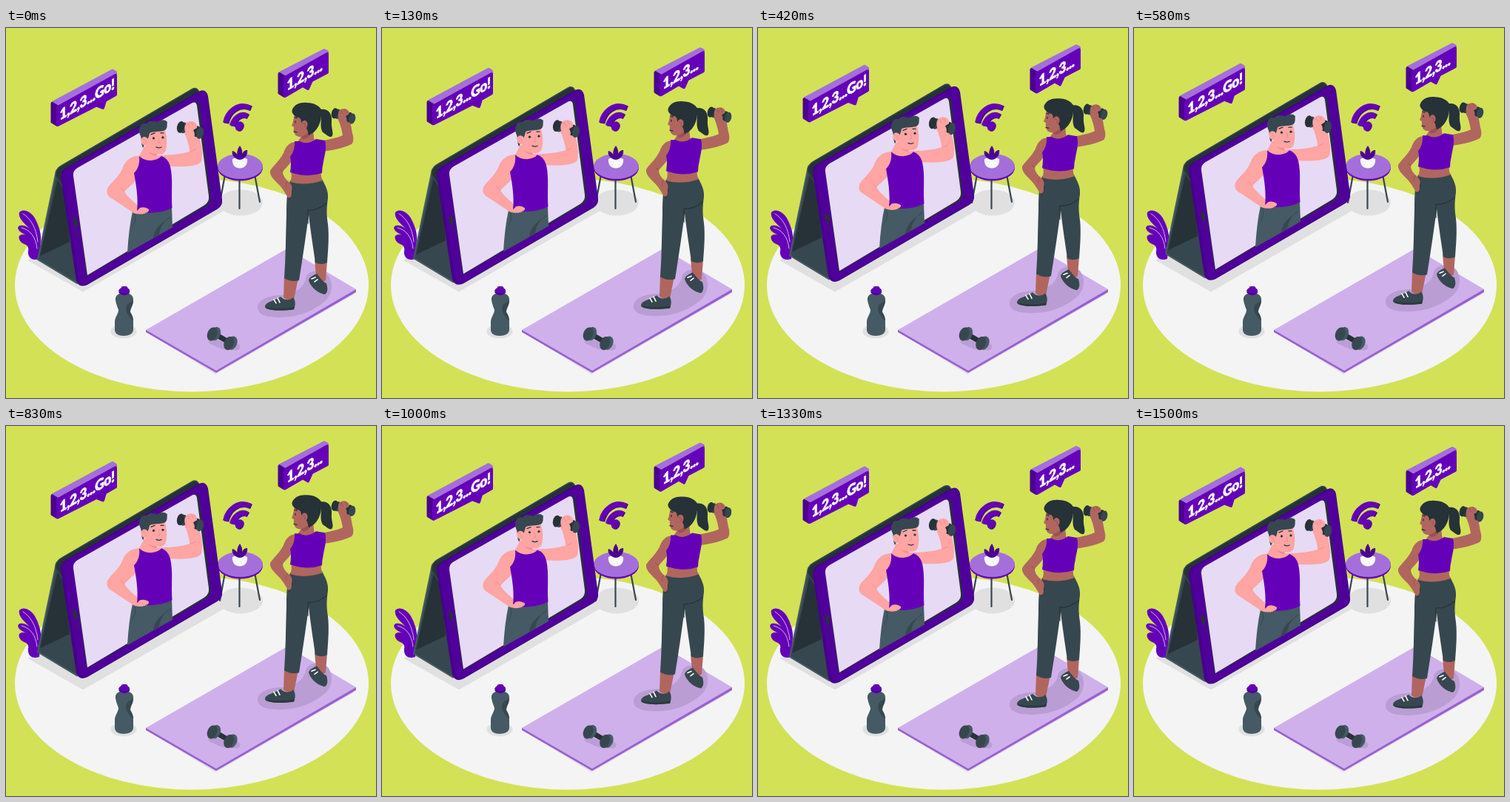
Recreate the animation shown at these times as an HTML page. Size 500x500 px, loop 1540 ms.

```html
<!DOCTYPE html>
<html lang="en">
<head>
<meta charset="utf-8">
<title>Online workout</title>
<style>
  html, body { margin: 0; height: 100%; overflow: hidden; background: #d3e157; }
  svg { display: block; width: 100vw; height: 100vh; }
  .purple { fill: #6500b9; }
  .deep { fill: #4b0090; }
  .lilac { fill: #a56fdb; }
  .ink { fill: #263238; }
  .slate { fill: #37474f; }
  .steel { fill: #455a64; }
  .shadow { fill: #e0e0e0; }
  .pink { fill: #ffa5a3; }
  .brown { fill: #b0665f; }
  .line { fill: none; stroke-linecap: round; stroke-linejoin: round; }
  text { font: 900 20px Lato, "Open Sans", sans-serif; letter-spacing: -.4px; fill: #fff; stroke: #fff; stroke-width: .6; }
</style>
</head>
<body>
<svg viewBox="0 0 500 500">
  <defs>
    <g id="dumbbell">
      <path class="line" stroke="#37474f" stroke-width="5" d="M-11-3L11 3"/>
      <ellipse class="slate" cx="-9" cy="-3" rx="5" ry="7.5" transform="rotate(12 -9 -3)"/>
      <ellipse class="ink" cx="-13" cy="-4" rx="5" ry="8" transform="rotate(12 -13 -4)"/>
      <ellipse class="ink" cx="9" cy="2" rx="5" ry="7.5" transform="rotate(12 9 2)"/>
      <ellipse class="slate" cx="13" cy="4" rx="5" ry="8" transform="rotate(12 13 4)"/>
    </g>
    <g id="wifi">
      <path fill="none" stroke-width="7" d="M296.500 128C299 114 313 100 330 108"/>
      <path fill="none" stroke-width="7" d="M305.500 132C308 122 317 114 326 119"/>
      <ellipse cx="315" cy="132.500" rx="5" ry="6.500" transform="rotate(25 315 132.500)" stroke="none"/>
    </g>
  </defs>

  <ellipse cx="251" cy="347.500" rx="239" ry="144" fill="#f4f4f4"/>

  <!-- Floor shadows -->
  <g class="shadow">
    <path d="M29 314L104 356.500 298 245 230 200Z"/>
    <ellipse cx="317" cy="236" rx="30" ry="17.500"/>
    <ellipse cx="159" cy="410" rx="17.500" ry="9.500"/>
    <path d="M193 413L283 468 470 360 400 330Z"/>
  </g>

  <!-- Wifi sign -->
  <use href="#wifi" x="1.500" y="1" fill="#4b0090" stroke="#4b0090"/>
  <use href="#wifi" fill="#6500b9" stroke="#6500b9"/>

  <!-- Side table -->
  <path class="line" stroke="#37474f" stroke-width="2.200" d="M296 198L289 236M315.500 205V244M336 198L343 235"/>
  <ellipse class="purple" cx="316.500" cy="189" rx="30.500" ry="17.500"/>
  <ellipse class="lilac" cx="316.500" cy="187" rx="30.500" ry="17"/>
  <path fill="#fafafa" d="M306 177Q316 171 326 177C327 184 323 189.500 316 189.500S305 184 306 177Z"/>
  <path class="deep" d="M312 177C306 174 305 169 306 166 310 167 312 170 313 172 311 167 314 162 316 159 318 162 320 166 319 171 320 167 323 165 326 165 327 170 324 175 320 177Q316 179 312 177Z"/>

  <!-- Plant -->
  <path class="purple" d="M45 312C36 315 29 311 30 301 31 298 30 295 27 293 20 291 16 285 18 281 21 278 25 279 28 280 20 277 14 272 17 268 21 265 28 268 32 271 24 264 16 256 18 249 23 243 34 248 39 257 43 264 48 277 47 286Z"/>
  <path class="line" stroke="#e9dcf5" stroke-width=".8" d="M23 251C33 257 41 270 43 289M21 270C33 273 40 282 42 298"/>

  <!-- Bottle -->
  <path class="steel" d="M148 368C147 361 153 358 160 358S173 361 172 369C171 377 168 378 168 384 171 389 172 392 172 398V408C172 413 166 416 159 416S147 413 147 408V397C147 391 152 386 152 381 150 376 149 373 148 368Z"/>
  <path class="slate" d="M172 369C171 377 168 378 168 384 171 389 172 392 172 396 168 392 163 387 162 380 162 374 166 371 172 369Z"/>
  <path class="deep" d="M152.500 354H167V358Q160 364.500 152.500 358Z"/>
  <ellipse class="purple" cx="159.800" cy="354.500" rx="7.200" ry="4"/>
  <rect class="purple" x="155.500" y="349" width="9" height="7" rx="3"/>

  <!-- Mat -->
  <path fill="#9a5fd2" d="M189 408V411L284 466 473 357V353Z"/>
  <path fill="#cfb0eb" d="M189 408L380 298 473 353 284 463Z"/>
  <path class="line" stroke="#bb9dd8" stroke-width="9" d="M278 423L294 430 312 431"/>
  <path class="line" stroke="#263238" stroke-width="7" d="M283 414L302 425"/>
  <g id="weight" transform="rotate(22 280 413)">
    <ellipse class="steel" cx="283" cy="412" rx="6.500" ry="9.500"/>
    <ellipse class="slate" cx="279" cy="414" rx="6.500" ry="9.500"/>
  </g>
  <use href="#weight" x="22.500" y="12.500"/>

  <g id="floating">
    <!-- Tablet and its stand -->
    <path class="slate" stroke="#455a64" stroke-width="2" stroke-linejoin="round" d="M68 193L43 313 96 345 84 240Z"/>
    <path class="ink" d="M71 199L46 308 86 289 79 205Z"/>
    <path class="ink" stroke="#37474f" stroke-width="1.500" d="M67 200Q67 190 75 186L251 83Q258 79 261 87L84 200 80 220Z"/>
    <path fill="#46008a" d="M81 189L260 86Q270 81 273 92L292 232Q293 240 286 244.500L110 347Q99 352 95 342L74 201Q73 193 81 189Z"/>
    <path fill="#50009a" d="M83 190L262 87.500Q269 85 272 94L291 231Q292 238 286 242.500L110 345Q102 349 99 340L77 202Q76 194 83 190Z"/>
    <path class="ink" d="M97 189L255 100.500Q260 98 261 105L276.500 229Q277 237 270 241L109 335.500 91 200Q91 193 97 189Z"/>
    <path fill="#e7daf4" d="M96.500 189L252 101Q257 99 258 105L274 227Q275 235 268 239.500L110 334 91 200Q90 193 96.500 189Z"/>
    <ellipse class="ink" cx="94" cy="263" rx="2.300" ry="7" transform="rotate(-8 94 263)"/>
    <path class="line" stroke="#263238" stroke-width="1.200" d="M90 255L91 262M96 274L97 280"/>

    <!-- Trainer -->
    <path class="steel" d="M171 248Q200 252 224 242L225 269.500 164 304Q166 270 171 248Z"/>
    <path class="slate" d="M199 284C200 274 206 266 217 259 211 265 208 271 207 279Z"/>
    <path class="line" stroke="#37474f" d="M174 252Q176 262 171 269M217 259L222 255"/>
    <path class="pink" d="M183 173C171 172 162 178 158 188 153 202 141 209 137 217 135 224 138 228 144 231L168 247C174 253 186 253 193 248 194 244 187 242 181 243 175 236 165 230 160 221 168 213 175 208 178 202Z"/>
    <path class="pink" d="M187 160L203 160 204 172C221 172 235 171 248 167 248 160 245 152 243 146 239 140 240 131 246 127 252 125 258 128 259 134L262 150C265 162 266 172 264 180 261 187 242 188 222 187L180 190V173Z"/>
    <path class="line" stroke="#f18c8c" d="M250 167L256 164M160 221L155 216"/>
    <path class="purple" d="M180 173Q186 179 196 179 206 178 210 173 219 176 222 187C226 205 223 223 224.500 243 212 250 190 252 177 247 179 230 176 213 173 196 179 190 181 182 180 173Z"/>
    <path class="pink" d="M181 243Q188 241 193 245 194 249 187 250L175 249Z"/>
    <path class="pink" d="M187 144L214 136C218 146 218 157 216 165 214 171 207 172 203 170L190 166Z"/>
    <path fill="#f18c8c" d="M192 167Q197 171 203 170L203 173Q196 172 192 167Z"/>
    <path class="slate" d="M185 162C182 156 184 149 181 144 178 136 182 127 190 129 193 124 199 126 204 127 210 124 214 123 218 127 217 130 219 135 215 138 208 141 201 139 194 142 193 148 191 151 189 154Z"/>
    <ellipse class="pink" cx="187.500" cy="153" rx="5" ry="6" transform="rotate(-18 187.500 153)"/>
    <path class="line" stroke="#f18c8c" d="M185 150Q189 151 189 156M206 149L208 155 205 156"/>
    <path class="line" stroke="#263238" stroke-width="1.300" d="M196 144L201 142M209 142L213 142M203 161Q207 163 210 161"/>
    <circle class="ink" cx="199.500" cy="149" r="1.600"/>
    <circle class="ink" cx="212" cy="148" r="1.600"/>
    <use href="#dumbbell" x="249" y="138"/>
    <path class="pink" d="M242 140C240 132 243 127 250 126 256 126 259 131 258 135L253 138Q257 145 253 147 246 149 242 140Z"/>
    <path class="line" stroke="#f18c8c" d="M246 129L248 134M251 128L253 132"/>

    <!-- Athlete -->
    <path fill="#b99dd3" d="M340 378C340 367 355 361 373 361 391 360 404 349 405 338 408 327 424 326 434 333 443 342 442 360 431 369 416 382 395 391 370 391 352 391 340 387 340 378Z"/>
    <path class="brown" d="M417 313L434 315 432 341Q426 346 419 336ZM376 336L395 338 389 367Q382 370 375 364Z"/>
    <path class="slate" d="M350 377C350 370 363 369 371 363 375 368 384 369 388 364 392 369 391 376 389 380 377 382 352 383 350 377Z"/>
    <path class="slate" d="M409 341C410 336 416 334 420 332 424 337 429 344 433 345 435 352 435 357 431 360 423 359 412 351 409 341Z"/>
    <path class="line" stroke="#fff" stroke-width="1.600" d="M362 367L365 372M367 365L370 371M413 339L418 337M417 343L421 340"/>
    <path fill="#2b393f" d="M350 377Q370 381 390 377L389 380.500Q357 384 350 377Z"/>
    <path class="slate" d="M384 206Q404 211 427 204C431 212 436 220 435 230 433 245 433 252 435 265 437 282 435 302 434 317Q426 321 418 317C416 302 412 278 409 252 406 276 401 310 396 341Q386 344 376 338C378 310 378 282 379 252 379 232 380 217 384 206Z"/>
    <path class="line" stroke="#263238" stroke-width="1.200" d="M433 237Q421 247 408 246L408 264M386 216Q388 224 383 231"/>
    <path class="brown" d="M385 193L426 194Q425 202 428 206 405 214 384 208Q387 201 385 193Z"/>
    <path class="brown" d="M424 153C434 151 446 149 455 145 454 137 451 128 448 122 449 113 457 109 463 114L468 142C470 148 470 154 467 157 455 163 441 165 428 167Z"/>
    <path class="brown" d="M400 145L415 144 417 152 430 157 415 168 388 163Z"/>
    <path class="brown" d="M392 154C383 154 378 160 375 169 370 179 361 186 357 193 356 199 362 205 367 210 372 214 376 221 381 229 384 231 387 227 386 221 388 214 385 210 381 207 377 203 374 199 374 194 382 185 388 179 390 171Z"/>
    <path class="line" stroke="#985250" d="M381 207Q377 210 379 215M374 194L370 191"/>
    <path class="purple" d="M390 153L397 153Q407 159 419 150L431 152C434 163 430 173 429 181Q427 189 427 196 407 203 384 195 386 182 384 174 391 165 390 153Z"/>
    <path class="brown" d="M391 114C388 121 389 126 386 132L389 134C388 142 391 148 399 147L402 153Q409 156 416 150L414 118Z"/>
    <path fill="#985250" d="M399 147Q406 145 409 140L411 145Q407 150 401 150Z"/>
    <path class="ink" d="M387 110C390 103 398 100 407 101 416 101 423 105 426 110 436 109 441 117 440 126 439 136 444 143 440 147 436 148 432 143 428 141 424 135 426 126 426 119 425 131 419 141 409 145L407 137 399 128C399 123 397 120 393 121 389 118 385 114 387 110Z"/>
    <ellipse class="brown" cx="403" cy="131" rx="4.500" ry="6" transform="rotate(12 403 131)"/>
    <path class="line" stroke="#985250" d="M401 129Q406 128 404 134"/>
    <path class="line" stroke="#263238" stroke-width="1.300" d="M390 121L393 122M391 126V128M389 140L393 141"/>
    <use href="#dumbbell" transform="translate(456 119) scale(.9)"/>
    <path class="brown" d="M449 121C448 113 451 109 457 109 463 110 465 114 463 117L459 119Q462 124 459 127 453 129 449 121Z"/>
    <path class="line" stroke="#985250" d="M453 111L455 116M458 110L460 115"/>

    <!-- Speech bubbles -->
    <g stroke-linejoin="round" stroke-width="4">
      <path class="lilac" stroke="#a56fdb" d="M63 101L144 57.500 148 60 148 66 70 108Z"/>
      <path class="deep" stroke="#4b0090" d="M62.500 102L69 106V131L62.500 127Z"/>
      <path class="purple" stroke="#6500b9" d="M70 107L148 64V90L134 98 131 108 122 104.500 70 131Z"/>
      <path class="lilac" stroke="#a56fdb" d="M370 61L430 30 434 32 434 38 377 68Z"/>
      <path class="deep" stroke="#4b0090" d="M369.500 62L376 66V92L369.500 88Z"/>
      <path class="purple" stroke="#6500b9" d="M377 67L434 35V60L413 71 408 82 401 78 377 92Z"/>
    </g>
    <text transform="matrix(.866 -.5 0 1 72.500 125)">1,2,3...Go!</text>
    <text transform="matrix(.866 -.5 0 1 379.500 85)">1,2,3...</text>
  </g>
</svg>
<script>
  const LOOP = 1540, PERIOD = 1500, PEAK = 700, RISE = 10;
  const floating = document.getElementById("floating");

  // Linear rise and fall, highest at PEAK.
  function draw(now) {
    const t = now % LOOP;
    const away = Math.abs(t - PEAK);
    const lift = Math.abs(1 - away / (PERIOD / 2));
    floating.setAttribute("transform", `translate(0 ${(0.6 - RISE * lift).toFixed(2)})`);
    requestAnimationFrame(draw);
  }
  draw(performance.now());
</script>
</body>
</html>
```
